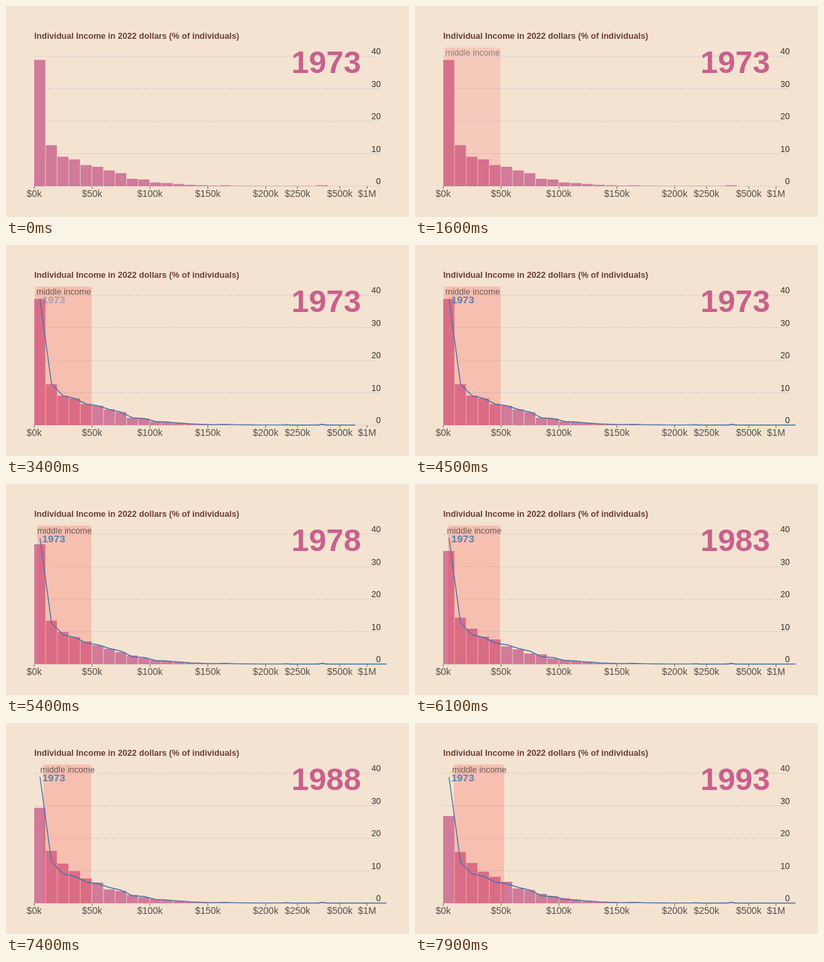
These frames come from a looping animation (600x315 px, 8 s). An HTML page:

```html
<!DOCTYPE html>
<html lang="en">
<head>
<meta charset="utf-8">
<title>Income histogram</title>
<style>
  html, body { margin: 0; width: 100%; height: 100%; overflow: hidden; background: #f4e3d1; }
  svg { display: block; width: 100vw; height: 100vh; font-family: "Liberation Sans", Arial, sans-serif; }
  .grid { stroke: #bcc5c8; stroke-dasharray: 2 2; }
  .tick { stroke: #77706a; }
  .bar { fill: #d17a9a; }
</style>
</head>
<body>
<svg viewBox="0 0 600 315" xmlns="http://www.w3.org/2000/svg"></svg>
<script>
const LOOP = 8000, LEFT = 42, BASE = 269, STEP = 17.23;
const svg = document.querySelector('svg');

function add(tag, attrs, text = '') {
  const el = document.createElementNS(svg.namespaceURI, tag);
  set(el, attrs);
  el.textContent = text;
  svg.append(el);
  return el;
}
function set(el, attrs) {
  for (const key in attrs) el.setAttribute(key, attrs[key]);
}

// Bar heights in px for the first twelve income bands.
const poses = [
  { at: 4650, band: [43.5, 127.5], bars: [188.5, 61.2, 44, 40, 31.5, 29, 23.5, 19.5, 11, 10, 5.5, 4.7] },
  { at: 5400, band: [46.5, 127], bars: [179, 65, 48, 40.5, 34, 28, 23, 18, 13, 9, 6, 5] },
  { at: 6100, band: [49, 126.5], bars: [169, 69.5, 53, 41, 37, 26.5, 22, 16, 14.7, 8.5, 6.5, 4.5] },
  { at: 7000, band: [54, 122], bars: [152.5, 79.5, 58.5, 48.5, 35, 30, 19.5, 17.5, 11, 7.5, 5, 4.2] },
  { at: 7900, band: [58, 132.7], bars: [130, 76.5, 60, 47, 39.5, 32, 22, 19.5, 14, 10.5, 7.5, 5.2] }
];
const tail = [3.3, 2.1, 1.4, 0.9, 1.4, 0.6, 0.5, 0.4];
const yearStarts = [4950, 5800, 6650, 7500];

add('text', { x: LEFT, y: 49, 'font-size': 12.6, 'font-weight': 700, fill: '#6b4034' },
  'Individual Income in 2022 dollars (% of individuals)');

for (let value = 0; value <= 40; value += 10) {
  const y = BASE - value * 4.85;
  add('path', { d: `M${LEFT} ${y}H558`, class: 'grid' });
  add('text', { x: 558, y: y - 3, 'font-size': 12.7, 'text-anchor': 'end', fill: '#38322f' }, value);
}

const ticks = { $0k: 42, $50k: 128.2, $100k: 214.3, $150k: 300.5, $200k: 386.6, $250k: 434, $500k: 497, $1M: 537.5 };
for (const [label, x] of Object.entries(ticks)) {
  add('path', { d: `M${x} ${BASE}v4`, class: 'tick' });
  add('text', { x, y: 285, 'font-size': 14, 'text-anchor': 'middle', fill: '#57504b' }, label);
}

const bars = [...poses[0].bars, ...tail].map((h, i) => add('rect', {
  class: 'bar', x: LEFT + i * STEP, y: BASE - h, width: STEP - 0.7, height: h
}));
add('rect', { class: 'bar', x: 386.6, y: BASE - 0.4, width: 75, height: 0.4 });
add('rect', { class: 'bar', x: 462, y: BASE - 1.4, width: 17, height: 1.4 });

const year = add('text', { x: 528.5, y: 100, 'font-size': 46.5, 'font-weight': 700, 'text-anchor': 'end', fill: '#c9608d' });
const band = add('rect', { y: 62, height: BASE - 62, fill: '#ff3c37' });
const bandLabel = add('text', { y: 74, 'font-size': 12.6, 'text-anchor': 'middle', fill: '#665a54' }, 'middle income');
const lineLabel = add('text', { x: 54, y: 87, 'font-size': 15.4, 'font-weight': 700, fill: '#5a82b0' }, '1973');

const points = [...poses[0].bars, ...tail].map((h, i) => `${LEFT + (i + 0.5) * STEP} ${BASE - h}`);
const line = add('path', {
  d: `M${points.join('L')}L413 268.5L418 268.3L424 268.7L467 268.7L471 267.5L475 268.7H566.5`,
  fill: 'none', stroke: '#4776a8', 'stroke-width': 1.4, 'stroke-linejoin': 'round', pathLength: 1
});

const clamp = v => Math.min(1, Math.max(0, v));
const mix = (a, b, k) => a + (b - a) * k;
function ease(t, start, end) {
  const k = clamp((t - start) / (end - start));
  return k < 0.5 ? 4 * k ** 3 : 1 - 4 * (1 - k) ** 3;
}

function draw(t) {
  let i = 0;
  while (i < poses.length - 2 && t > poses[i + 1].at) i++;
  const a = poses[i], b = poses[i + 1];
  const k = clamp((t - a.at) / (b.at - a.at));

  a.bars.forEach((h, n) => {
    const height = mix(h, b.bars[n], k);
    set(bars[n], { y: BASE - height, height });
  });

  const [x0, x1] = a.band.map((x, n) => mix(x, b.band[n], k));
  const shown = ease(t, 1000, 2050);
  set(band, { x: x0, width: x1 - x0, opacity: 0.21 * shown });
  set(bandLabel, { x: (x0 + x1) / 2 + 0.4, opacity: shown });

  const drawn = ease(t, 2000, 3900);
  set(line, { 'stroke-dasharray': `${drawn} 2`, visibility: drawn ? 'visible' : 'hidden' });
  set(lineLabel, { opacity: ease(t, 2900, 3900) });
  year.textContent = 1973 + 5 * yearStarts.filter(start => t >= start).length;
}

function tick() {
  draw(performance.now() % LOOP);
  requestAnimationFrame(tick);
}
tick();
</script>
</body>
</html>
```
